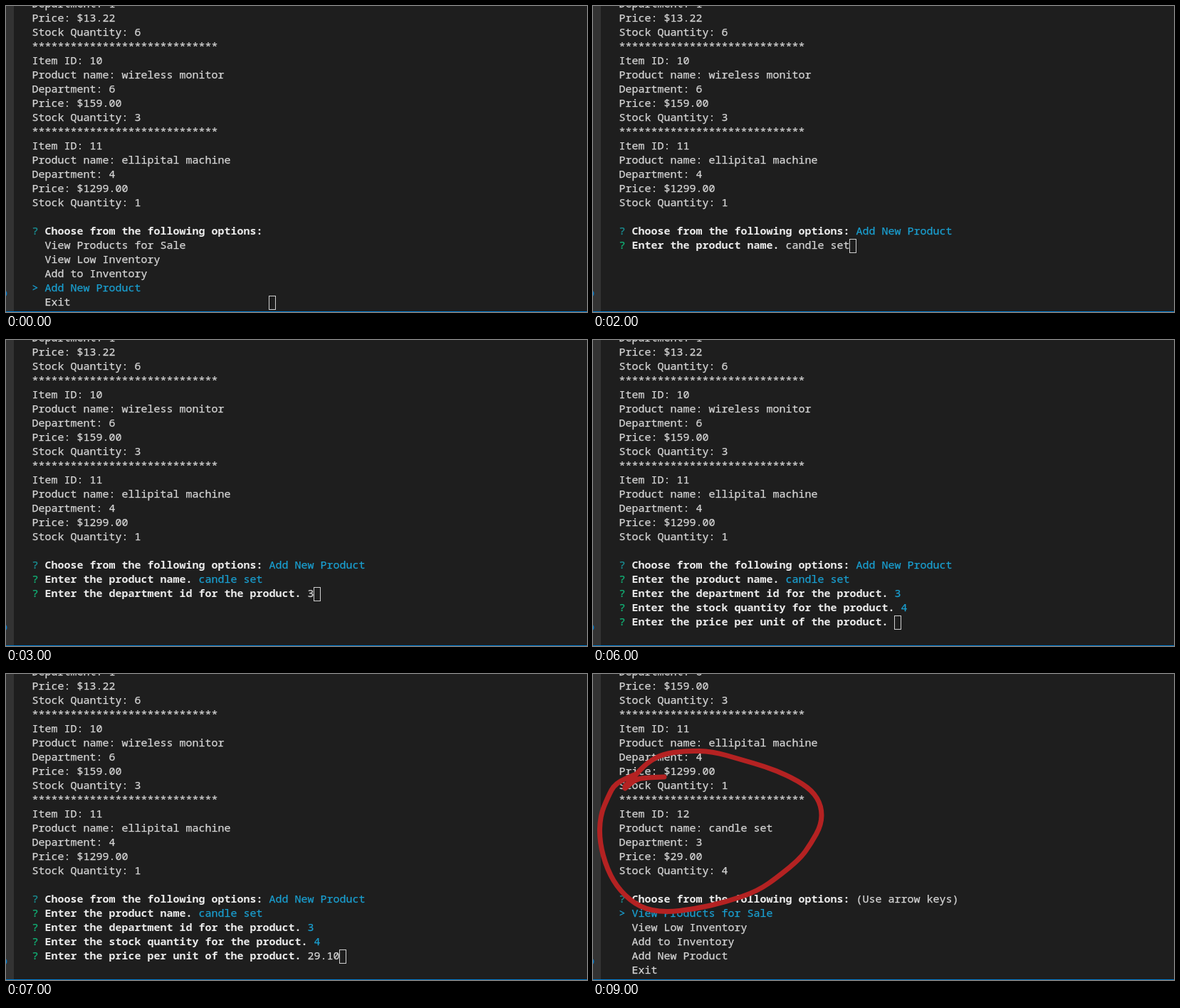
These frames come from a looping animation (816 by 431 pixels, 10 s). An HTML page:

```html
<!DOCTYPE html>
<html lang="en">
<head>
<meta charset="utf-8">
<title>Inventory terminal</title>
<style>
  html, body { margin: 0; width: 100%; height: 100%; overflow: hidden; background: #1e1e1e; }
  svg { display: block; width: 816px; height: 431px; }
  text {
    font: 15px "Noto Sans Mono", "DejaVu Sans Mono", monospace; white-space: pre;
    fill: currentColor; stroke: currentColor; stroke-width: .25px; color: #d6d6d6;
  }
  .bold { font-weight: 700; color: #ececec; stroke: none; }
  .cyan { color: #1a9fd0; }
  .green { color: #12b276; }
  .teal { color: #1a9296; }
</style>
</head>
<body>
<svg viewBox="0 0 816 431">
  <rect width="816" height="431" fill="#1e1e1e"/>
  <rect width="11" height="431" fill="#333"/>
  <circle cx="-4" cy="405" r="5.5" fill="#007acc"/>
  <g id="screen"></g>
  <rect id="cursor" width="9" height="19" fill="none" stroke="#d0d0d0"/>
  <path id="mark" fill="none" stroke="#b42222" stroke-width="7" stroke-linecap="round" stroke-linejoin="round"/>
  <rect y="430" width="816" height="1" fill="#007acc"/>
</svg>
<script>
const CELL = 9, ROW = 20, LEFT = 36, LOOP = 10000, STEP = 1000;
const screen = document.getElementById("screen");
const cursor = document.getElementById("cursor");
const mark = document.getElementById("mark");

const item = (id, name, dept, price, qty) => [
  "*".repeat(29), "Item ID: " + id, "Product name: " + name,
  "Department: " + dept, "Price: $" + price, "Stock Quantity: " + qty
];
const monitor = item(10, "wireless monitor", 6, "159.00", 3);
const machine = item(11, "ellipital machine", 4, "1299.00", 1);
const candles = item(12, "candle set", 3, "29.00", 4);
const products = [...item(9, "", 1, "13.22", 6).slice(3), ...monitor, ...machine, ""];

const options = ["View Products for Sale", "View Low Inventory", "Add to Inventory", "Add New Product", "Exit"];
const menu = picked => options.map((o, i) => i === picked ? [["cyan", "> " + o]] : "  " + o);

// A prompt line is a list of [style, text] runs.
const ask = (question, answer = "", style = "cyan", tint = "green") =>
  [[tint, "? "], ["bold", question + " "], [style, answer]];
const choose = (answer, style, tint = "teal") =>
  ask("Choose from the following options:", answer, style, tint);

const prompts = [
  ["Enter the product name.", "candle set"],
  ["Enter the department id for the product.", "3"],
  ["Enter the stock quantity for the product.", "4"],
  ["Enter the price per unit of the product.", "29.10"]
];
const answered = n => prompts.slice(0, n).map(([q, a]) => ask(q, a));
const width = line => line.reduce((sum, run) => sum + run[1].length, 0);

function form(n, typed) {
  const line = ask(prompts[n][0], typed, "");
  return {
    rows: [...products, choose("Add New Product"), ...answered(n), line],
    caret: [width(line), 17 + n]
  };
}

const fresh = [choose("(Use arrow keys)", ""), ...menu(0)];
const states = [
  { rows: [...products, choose(), ...menu(3)], caret: [37, 21] },
  form(0, ""),
  form(0, "candle set"),
  form(1, "3"),
  form(2, ""),
  form(2, "4"),
  form(3, ""),
  form(3, "29.10"),
  { rows: [monitor[5], ...machine, "", choose("Add New Product", "cyan", "green"), ...answered(4),
           "", "Product successfully added.", "", ...fresh] },
  { rows: [...monitor.slice(3), ...machine, ...candles, "", ...fresh], circled: true }
];

// Smooth pen stroke: quadratic curves through the midpoints.
function stroke(points) {
  const mids = points.slice(1, -1).map(([x, y], i) => {
    const [nx, ny] = points[i + 2];
    return `Q${x} ${y} ${(x + nx) / 2} ${(y + ny) / 2}`;
  });
  return `M${points[0]}${mids.join("")}L${points[points.length - 1]}`;
}
const hook = [[100, 145], [72, 146], [59, 149], [45, 161]];
const loop = [
  [45, 158], [58, 144], [76, 125], [97, 113], [130, 108], [168, 109], [206, 120], [244, 131],
  [280, 146], [308, 164], [321, 186], [321, 212], [306, 239], [291, 260], [262, 284], [231, 306],
  [187, 321], [143, 331], [100, 336], [66, 329], [38, 306], [20, 276], [9, 236], [10, 200],
  [21, 173], [31, 154], [58, 142]
];
mark.setAttribute("d", stroke(hook) + stroke(loop));

function addText(col, row, style, str) {
  const el = document.createElementNS("http://www.w3.org/2000/svg", "text");
  el.setAttribute("x", LEFT + 0.4 + col * CELL);
  el.setAttribute("y", row * ROW + 2);
  el.setAttribute("class", style);
  el.textContent = str;
  screen.append(el);
}

function draw({ rows, caret, circled }) {
  screen.replaceChildren();
  rows.forEach((line, row) => {
    let col = 0;
    for (const [style, str] of Array.isArray(line) ? line : [["", line]]) {
      if (str) addText(col, row, style, str);
      col += str.length;
    }
  });
  cursor.style.display = caret ? "" : "none";
  if (caret) {
    cursor.setAttribute("x", LEFT + caret[0] * CELL + 0.5);
    cursor.setAttribute("y", caret[1] * ROW - 11.5);
  }
  mark.style.display = circled ? "" : "none";
}

const start = performance.now();
let shown = -1;
function tick() {
  const step = Math.floor((performance.now() - start) % LOOP / STEP);
  if (step !== shown) draw(states[shown = step]);
  requestAnimationFrame(tick);
}
tick();
</script>
</body>
</html>
```
